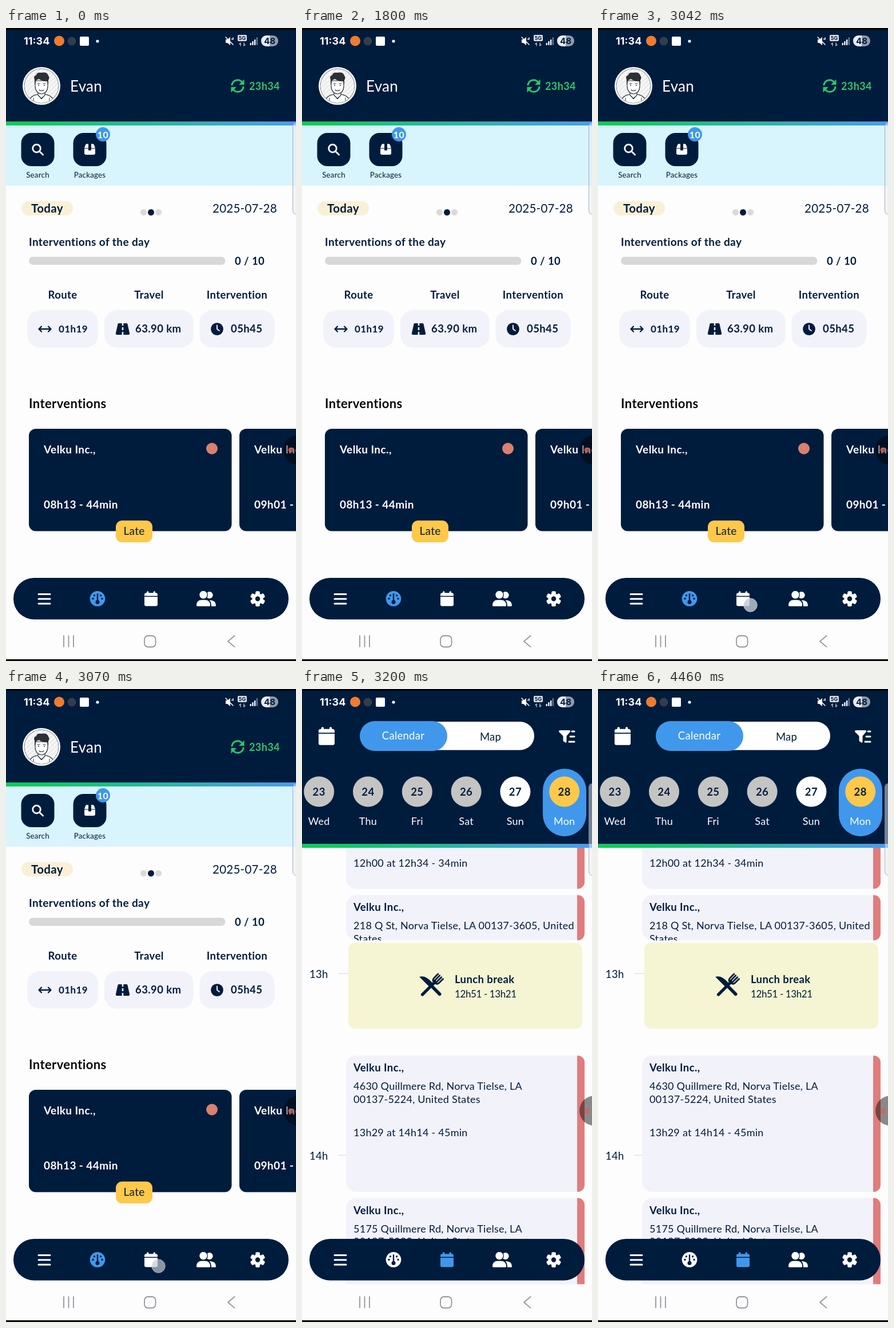
These frames come from a looping animation (507x1104 px, 5.3 s). An HTML page:

```html
<!DOCTYPE html>
<html lang="en">
<head>
<meta charset="utf-8">
<title>Visit planner</title>
<style>
  html, body { margin: 0; width: 100%; height: 100%; overflow: hidden; background: #fdfdfd; }
  svg { display: block; }
  text { font-family: Lato, "Open Sans", sans-serif; letter-spacing: .25px; white-space: pre; }
  .b { font-weight: 700; letter-spacing: .4px; }
  .m { text-anchor: middle; }
  .tight { letter-spacing: -.4px; }
  .ui { font-family: Inter, sans-serif; font-weight: 700; letter-spacing: 0; }
</style>
</head>
<body>
<svg id="stage" width="100%" height="100%" viewBox="0 0 507 1104"></svg>
<script>
const NAVY = '#001c3d', BLUE = '#4098ec', PAPER = '#fdfdfd', LILAC = '#f2f2fa',
      GREEN = '#2bc66b', RED = '#df7d7c', YELLOW = '#fec84a', WHITE = '#fff';
const LOOP = 5300, TAP = 3000, TAP_FADE = 3070, OPEN = 3130, SCROLL = 3200;
const HOUR = 317, SCROLL_BY = 1402;

const text = (x, y, s, size = 18, cls = '', fill = NAVY) =>
  `<text x="${x}" y="${y}" font-size="${size}" class="${cls}" fill="${fill}">${s}</text>`;
const rect = (x, y, w, h, fill, r = 0) =>
  `<rect x="${x}" y="${y}" width="${w}" height="${h}" rx="${r}" fill="${fill}"/>`;
const circle = (x, y, r, fill, more = '') =>
  `<circle cx="${x}" cy="${y}" r="${r}" fill="${fill}" ${more}/>`;
const fillPath = (d, fill) => `<path d="${d}" fill="${fill}"/>`;
const line = (d, stroke, width = 2) =>
  `<path d="${d}" fill="none" stroke="${stroke}" stroke-width="${width}" stroke-linecap="round" stroke-linejoin="round"/>`;
const at = (x, y, body, scale = 1, turn = 0) =>
  `<g transform="translate(${x} ${y}) rotate(${turn}) scale(${scale})">${body}</g>`;

// Icons, each centred on its own origin
const calendarIcon = color =>
  rect(-7.5, -13, 3.4, 6, color, 1.5) + rect(4.1, -13, 3.4, 6, color, 1.5) +
  fillPath('M-11.5-4.8v-2.2q0-3 3-3h17q3 0 3 3v2.2z', color) +
  fillPath('M-11.5-3.2h23v13.2q0 3-3 3h-17q-3 0-3-3z', color);

const gaugeIcon = color => circle(0, 0, 13.3, color) +
  [[-8, 0], [-5.6, -5.6], [5.6, -5.6], [8, 0]].map(p => circle(...p, 1.7, NAVY)).join('') +
  line('M0-8V6', NAVY, 2.4) + circle(0, 6, 3.5, NAVY);

const peopleIcon =
  circle(5.7, -6, 6, WHITE) + fillPath('M4 3h4q9 1 9 9 0 1.5-1.5 1.5H4z', WHITE) +
  circle(-5, -6.5, 8, NAVY) + circle(-5, -6.5, 6.7, WHITE) +
  fillPath('M-18 14q0-13 9-13H0q9 0 9 13z', NAVY) +
  fillPath('M-17 12q0-9.5 9.5-9.5h5Q7 2.5 7 12q0 1.5-1.5 1.5h-21q-1.5 0-1.5-1.5z', WHITE);

const gearIcon = [0, 60, 120].map(a => at(0, 0, rect(-3.8, -13.2, 7.6, 26.4, WHITE, 2), 1, a)).join('') +
  circle(0, 0, 9.6, WHITE) + circle(0, 0, 4.2, NAVY);

const refreshIcon =
  line('M-10-2A10 10 0 0 1 8-6M10 2A10 10 0 0 1-8 6', GREEN, 3) +
  fillPath('M11.5-11.5v9.5h-9.5zM-11.5 11.5v-9.5h9.5z', GREEN);

const boxIcon =
  fillPath('M-9.5-2l2-5.8q.7-1.7 2.4-1.7h2.6v7.5zM9.5-2l-2-5.8q-.7-1.7-2.4-1.7h-2.6v7.5z', WHITE) +
  fillPath('M-9.500-1h7v3h5v-3h7v7.800q0 2.700-2.700 2.700h-13.600q-2.700 0-2.700-2.700z', WHITE);

const roadIcon = fillPath('M-7-10H7q1 0 1.4 1L12 7q.6 3-2 3H-10q-2.6 0-2-3L-8.4-9q.4-1 1.4-1z', NAVY) +
  [[-10, 4], [-3, 5], [5, 5]].map(([y, h]) => rect(-1.3, y, 2.6, h, LILAC)).join('');

const cutleryIcon =
  at(0, 0, fillPath('M-4-27q11 5 9 25l-2 3h-7zM-3-2h6v25q-3 4-6 0z', NAVY), .95, -45) +
  at(0, 0, line('M0-10V23', NAVY, 5.5) +
    line('M-6.5-24V-14q0 6 6.5 6t6.5-6V-24M-2.200-24V-11M2.200-24V-11', NAVY, 3), .95, 45);

const avatar = `<clipPath id="face"><circle r="29.5"/></clipPath>` +
  circle(0, 0, 33, WHITE) + circle(0, 0, 30, '#ededee', 'stroke="#555d69" stroke-width=".8"') +
  `<g clip-path="url(#face)">` +
  Array.from({length: 16}, (_, i) => line(`M${i * 8 - 90} 30l60-60`, '#fafafa', 2)).join('') +
  `<g stroke="#2c3036" stroke-width="1.2">` +
  fillPath('M-23 32q1-14 15-17h16q14 3 15 17z', WHITE) +
  fillPath('M-6 8v8l6 6 6-6V8z', WHITE) +
  fillPath('M-11-9V1q1 12 11 13 10-1 11-13V-9z', WHITE) + '</g>' +
  fillPath('M-12-1v-10q-3-6 3-8 1-5 8-4 11-2 13 5 3 3 0 8v9l-2-7q-10 0-14-4-6 1-6 5z', '#2c3036') +
  line('M-7-4h4M3-4h4M-4 7q4 3 8 0', '#2c3036', 1.2) + circle(-5, -1, 1, '#2c3036') + circle(5, -1, 1, '#2c3036') +
  line('M-14 21v9M14 21v9M-6 16l6 7 6-7', '#2c3036', 1) + '</g>';

const header = h => rect(0, 0, 507, h, NAVY) + rect(0, h, 507, 7, 'url(#stripe)');

const statusBar = rect(0, 0, 507, 3, '#000') +
  text(31, 29, '11:34', 18, 'ui', WHITE) +
  circle(93, 22.5, 9, '#ee7c31') + circle(115, 23, 7.5, '#343c4b') +
  rect(129, 15, 16, 16, WHITE, 2) + circle(160, 23, 2.6, WHITE) +
  fillPath('M384 20h3l5-4v14l-5-4h-3z', WHITE) + line('M384 16l13 13M395 19v1M397 17v3', WHITE, 1.5) +
  rect(405, 12, 16, 11, '#dfe3e8', 2) + text(413, 21, '5G', 9, 'ui m') +
  line('M410 31v-5l-2 2M416 26v5l2-2', '#b5bdc8', 1.4) +
  [4, 7, 10, 14].map((h, i) => rect(426.5 + i * 3.7, 30 - h, 2.4, h, i < 3 ? WHITE : '#68778d', 1)).join('') +
  rect(446, 13, 30, 19, '#8f9aaa', 9.5) + fillPath('M461 13h-5.5a9.5 9.5 0 0 0 0 19h5.5z', '#e9ecef') +
  text(461, 28, '48', 15, 'ui m');

const cardName = 'Velku Inc.,';
const visitCard = (x, start) => rect(x, 699, 354.5, 178.5, NAVY, 12) +
  text(x + 26, 742, cardName, 19, 'b', WHITE) + text(x + 26, 838, start + ' - 44min', 19, 'b', WHITE);

const statistic = (x, w, cx, label, value, valueX, size, icon) =>
  text(cx, 472, label, 18.5, 'b m') + rect(x, 492, w, 65.5, LILAC, 22) +
  text(valueX, 531, value, size, 'b') + icon;

const dashboard = header(163) + at(62, 101, avatar) +
  text(112, 111, 'Evan', 26, '', WHITE) + at(405, 101, refreshIcon) + text(425, 107.5, '23h34', 18, 'b', GREEN) +
  rect(0, 170, 507, 105, '#d8f4fc') +
  rect(26.5, 183, 58, 58, NAVY, 18) + rect(117.5, 183, 58, 58, NAVY, 18) +
  circle(53.5, 210, 6.8, 'none', 'stroke="#fff" stroke-width="2.8"') + line('M59 215.5l5.5 5.5', WHITE, 2.8) +
  at(146.5, 211.5, boxIcon) + circle(169.5, 185.5, 12.5, BLUE) + text(169.5, 191.5, '10', 16, 'b m', WHITE) +
  text(55.5, 261, 'Search', 13.3, 'm') + text(146.5, 261, 'Packages', 13.3, 'm') +
  rect(27, 302, 90, 25, '#faf0d5', 12.5) + text(72, 322, 'Today', 20.5, 'b m') +
  [240.5, 253.5, 266.5].map((x, i) => circle(x, 321.5, 5.5, i === 1 ? NAVY : '#d9d9d9')).join('') +
  text(361, 321.5, '2025-07-28', 20.5) +
  text(40, 380, 'Interventions of the day', 19, 'b') +
  rect(40, 399, 343.5, 14, '#d8d8d8', 7) + text(400, 412.5, '0 / 10', 18.5, 'b') +
  statistic(37.5, 123.5, 99, 'Route', '01h19', 92, 17,
    line('M58.5 525h19M62 520.5l-4.5 4.5 4.5 4.5M74 520.5l4.5 4.5-4.5 4.5', NAVY, 2.3)) +
  statistic(172, 156, 250, 'Travel', '63.90 km', 226, 18.5, at(204, 525, roadIcon)) +
  statistic(338.5, 131, 404, 'Intervention', '05h45', 393, 18.5,
    circle(369, 525, 10.8, NAVY) + line('M369 518.5v6.5l4 3', LILAC, 2)) +
  text(40, 663, 'Interventions', 22, 'b', '#080a0e') +
  visitCard(40, '08h13') + visitCard(408, '09h01') + circle(360, 733.5, 10, '#d9806f') +
  rect(192, 859, 64, 38, YELLOW, 11) + text(224, 884, 'Late', 19, 'm');

// Schedule: vertical position follows the time of day
const hourY = h => 314 + (h - 8) * HOUR;
const visits = [
  [8, 13, 44, ['3915 W Baron Tevil Dr, Orvel, LA 00132-2846,', 'United States'], '08h13 at 08h57 - 44min'],
  [9, 1, 38, ['350 W Baron Tevil Dr, Dorvenelt, LA', '00143-6290, United States'], '09h01 at 09h39 - 38min'],
  [9, 44, 22, ['3967 W Baron Tevil Dr, Orvel, LA 00132-2846,', 'United States'], ''],
  [12, 0, 34, [], '12h00 at 12h34 - 34min'],
  [12, 36, 15, ['218 Q St, Norva Tielse, LA 00137-3605, United', 'States'], ''],
  [13, 29, 45, ['4630 Quillmere Rd, Norva Tielse, LA', '00137-5224, United States'], '13h29 at 14h14 - 45min'],
  [14, 16, 40, ['5175 Quillmere Rd, Norva Tielse, LA', '00137-5229, United States'], '']
];
const visit = ([h, m, minutes, address, time], i) => {
  const top = hourY(h + m / 60) - 11, height = minutes * HOUR / 60;
  return `<svg x="77" y="${top}" width="417" height="${height}">` +
    rect(0, 0, 417, height, LILAC, 18) +
    fillPath(`M404 0h1a12 12 0 0 1 12 12V${height - 12}a12 12 0 0 1-12 12h-1z`, RED) +
    text(13, 28, cardName, 18.5, 'b') +
    address.map((s, row) => text(13, 60 + row * 22.7, s)).join('') + text(13, 141, time) +
    (i ? '' : rect(13, 180, 126, 38, BLUE, 6) + text(76, 205, 'Your next visit', 18, 'm', WHITE)) + '</svg>';
};
const lunchY = hourY(12.85) - 7;
const schedule = [8, 9, 10, 11, 12, 13, 14, 15].map(h =>
    text(13, hourY(h) + 7, String(h).padStart(2, '0') + 'h', 18.5) +
    rect(63, hourY(h) - 1.5, 431, 1.5, '#e3e3e6')).join('') +
  visits.map(visit).join('') +
  rect(490, lunchY, 4, 150, PAPER) + rect(81, lunchY, 409, 150, '#f5f5d3', 12) +
  at(226, lunchY + 75, cutleryIcon) +
  text(267, lunchY + 71, 'Lunch break', 18.5, 'b') + text(267, lunchY + 96, '12h51 - 13h21', 17, 'tight');

const day = (name, i) => {
  const x = 29.7 + i * 85.8, fill = i === 5 ? YELLOW : i === 4 ? WHITE : '#c4c4c3';
  return (i === 5 ? rect(421, 139, 76, 118, BLUE, 38) : '') + circle(x, 179, 26.5, fill) +
    text(x, 185.5, 23 + i, 18.5, 'b m') + text(x, 237, name, 18, 'm', WHITE);
};
const planner =
  `<g clip-path="url(#list)"><g id="schedule">${schedule}</g></g>` + header(270) +
  at(43, 82, calendarIcon(WHITE), 1.22) +
  rect(102, 57, 304, 49.5, WHITE, 24.7) + rect(101, 56, 153, 52, BLUE, 26) +
  text(177, 88, 'Calendar', 18.5, 'm', WHITE) + text(329.5, 89.5, 'Map', 18.5, 'm') +
  fillPath('M451 72h17q2 1 .5 3l-6 7v10q-1 2.5-3 1l-3-2.5v-8.5l-7-7q-1.5-2 1.5-3z', WHITE) +
  line('M472 74h4M469 83h7M467 92h9', WHITE, 3) +
  ['Wed', 'Thu', 'Fri', 'Sat', 'Sun', 'Mon'].map(day).join('');

const navBar = rect(13, 959, 481, 72.5, NAVY, 36) +
  line('M57 987.5h20M57 995.8h20M57 1004h20', WHITE, 3) +
  at(350, 995, peopleIcon) + at(440, 995.5, gearIcon) +
  line('M101 1060v19M109.5 1060v19M118 1060v19', '#92969d', 1.8) +
  `<rect x="242" y="1060" width="19.5" height="19.5" rx="6" fill="none" stroke="#92969d" stroke-width="1.8"/>` +
  line('M399.5 1060l-11.5 9.7 11.5 9.7', '#92969d', 1.8) + rect(0, 1101, 507, 3, '#000');

const tabs = (gauge, calendar) => at(160, 995.3, gaugeIcon(gauge)) + at(253.5, 995.3, calendarIcon(calendar));
const overlays =
  `<rect x="501.5" y="165" width="14" height="160" rx="6" fill="#e8ecf2" fill-opacity=".5" stroke="#8a95a8" stroke-opacity=".7"/>` +
  circle(511, 735.5, 26, '#000', 'fill-opacity=".46"') + circle(498, 736, 4.5, '#d95b58', 'fill-opacity=".75"');

const stage = document.getElementById('stage');
stage.innerHTML = `<defs>
  <linearGradient id="stripe"><stop offset=".1" stop-color="#0fcb5b"/><stop offset="1" stop-color="#4c9bee"/></linearGradient>
  <clipPath id="list"><rect y="276" width="507" height="762"/></clipPath></defs>` +
  rect(0, 0, 507, 1104, PAPER) +
  `<g id="dashboard">${dashboard}</g><g id="planner">${planner}</g>` + statusBar + navBar +
  `<g id="homeTabs">${tabs(BLUE, WHITE)}</g><g id="planTabs">${tabs(WHITE, BLUE)}</g>` + overlays +
  `<g id="tap">${circle(266.5, 1006.5, 11.7, '#c3c9d2', 'stroke="#e2e5ea" stroke-width="1"')}</g>`;

const part = id => document.getElementById(id);
const show = (id, visible) => part(id).style.display = visible ? '' : 'none';

function draw(now) {
  const t = now % LOOP, opened = t >= OPEN;
  show('dashboard', !opened);
  show('homeTabs', !opened);
  show('planner', opened);
  show('planTabs', opened);
  show('tap', t >= TAP && !opened);
  part('tap').setAttribute('opacity', t < TAP_FADE ? .82 : .7);
  part('schedule').setAttribute('transform', `translate(0 ${t >= SCROLL ? -SCROLL_BY : 0})`);
}

const start = performance.now();
function tick() {
  draw(performance.now() - start);
  requestAnimationFrame(tick);
}
tick();
</script>
</body>
</html>
```
